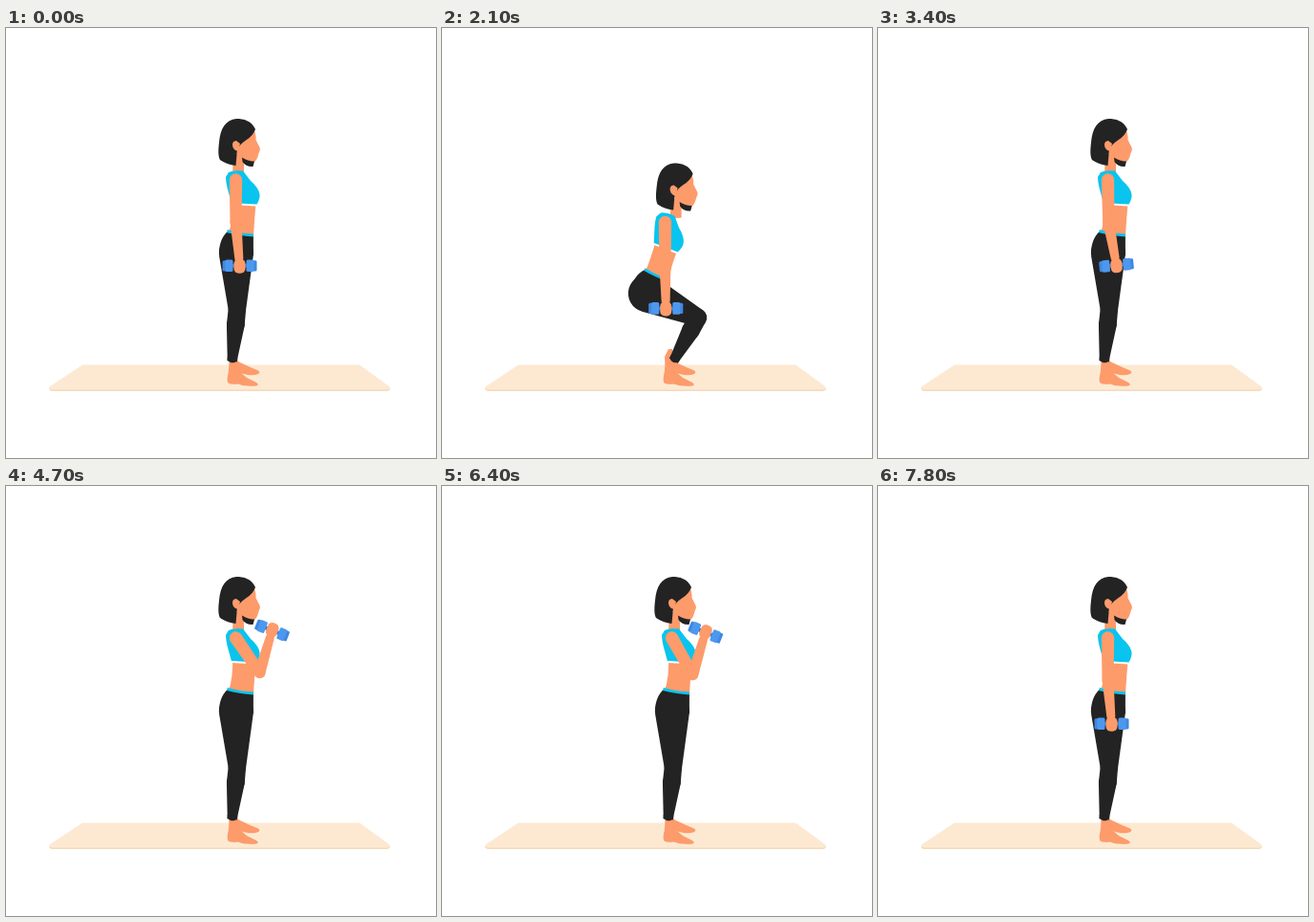
These frames come from a looping animation (450x450 px, 8000 ms). An HTML page with a canvas:

```html
<!DOCTYPE html>
<html lang="en">
<head>
<meta charset="utf-8">
<title>Squat, curl and press</title>
<style>
  html, body { margin: 0; width: 100%; height: 100%; overflow: hidden; background: #fff; }
  canvas { display: block; width: 450px; height: 450px; }
</style>
</head>
<body>
<canvas id="stage" width="450" height="450"></canvas>
<script>
const ctx = document.getElementById('stage').getContext('2d');
const LOOP = 8000, STEP = 100, RAD = Math.PI / 180;
const SKIN = '#fd9b6b', BLACK = '#232323', CYAN = '#08c4ee';

const ease = (t, from, to) => {
  const x = Math.min(1, Math.max(0, (t - from) / (to - from)));
  return (1 - Math.cos(Math.PI * x)) / 2;
};

function shape(path, color) {
  ctx.fillStyle = color;
  ctx.fill(new Path2D(path));
}

// Hull of two circles [x, y, r]
function limb([x1, y1, r1], [x2, y2, r2], color) {
  const dir = Math.atan2(y2 - y1, x2 - x1);
  const off = Math.acos((r1 - r2) / Math.hypot(x2 - x1, y2 - y1));
  ctx.fillStyle = color;
  ctx.beginPath();
  ctx.arc(x1, y1, r1, dir + off, dir - off + 2 * Math.PI);
  ctx.arc(x2, y2, r2, dir - off, dir + off);
  ctx.fill();
}

function box(x, y, w, h, r, color) {
  ctx.fillStyle = color;
  ctx.beginPath();
  ctx.roundRect(x, y, w, h, r);
  ctx.fill();
}

// A rigid part: turns around a pivot, which then moves to a new place
function frame(px, py, x, y, deg) {
  const c = Math.cos(deg * RAD), s = Math.sin(deg * RAD);
  return {
    at: (u, v) => [x + (u - px) * c - (v - py) * s, y + (u - px) * s + (v - py) * c],
    draw(paint) {
      ctx.save();
      ctx.translate(x, y);
      ctx.rotate(deg * RAD);
      ctx.translate(-px, -py);
      paint();
      ctx.restore();
    }
  };
}

// Angle 0 hangs down, positive swings forward
const swing = ([x, y], length, deg) =>
  [x + length * Math.sin(deg * RAD), y + length * Math.cos(deg * RAD)];

function drawMat() {
  shape('M49 374H398L402 377Q402 380 398 380H49Q45 380 45 377Z', '#f3dabd');
  shape('M80 352.5H370L401 375Q403 378.5 398 378.5H49Q44 378.5 46 375Z', '#fde9d2');
}

function drawFeet() {
  shape('M238 346L245 350Q255 355 263 358Q267 360 264 362Q260 364 253 363L240 360Z', SKIN);
  shape('M233 344L237 336H241L242 344L243 355Q245 361 252 366L261 370.5Q266 373 262 374.5Q250 375.5 243 372.5Q235 373.5 232.5 371.5Q231 369 232 364Q234 356 233 344Z', SKIN);
}

function drawHead() {
  shape('M238 132H249V152L237 153Z', SKIN);
  shape('M258 104Q262 110 261.5 117L265 124Q267 127 264.5 131Q263 138 260 140L245 138L236 118Z', SKIN);
  shape('M247 135.5Q253 139.5 260 139.5L258.5 145Q251 145.5 247.5 140Z', BLACK);
  shape('M261 106C257 97 249 95 241 95C230 96 224 105 223 120C222 128 222 134 224 138Q231 143 240.5 144L242 127Q245 121.5 251 117.5Q258.5 113 261 106Z', BLACK);
  shape('M241 118C237 118 236 122 238 126Q240 129 243 129L245 121Z', SKIN);
}

function drawTop() {
  shape('M233 151Q238 148.5 248 149.5L256 160Q263 166 265 172Q267 178 262 185L236 183.5L231.5 167Q230 161 230 156Z', CYAN);
  shape('M236 183L262 184.5V186.5L236 185Z', '#fff');
}

function drawDumbbell() {
  box(-9, -2, 18, 4, 1, '#3474c4');
  for (const side of [-1, 1]) {
    box(side * 15.5 - 2.5, -5.6, 5, 11.2, 1.5, '#4088e0');
    box(side * 11 - 4, -6.3, 8, 12.6, 1.5, '#4d98ef');
  }
}

function drawArm(shoulder, upper, fore, tilt) {
  const elbow = swing(shoulder, 44, upper);
  const wrist = swing(elbow, 38, fore);
  const hand = swing(elbow, 46, fore);
  limb([...shoulder, 6.7], [...elbow, 6], SKIN);
  limb([...elbow, 6], [...wrist, 4.5], SKIN);
  frame(0, 0, ...hand, tilt).draw(() => {
    drawDumbbell();
    box(-6, -7, 12, 15, 5, SKIN);
  });
}

function drawLeg(hip, hipRadius, knee, cuff) {
  const [dx, dy] = [cuff[0] - knee[0], cuff[1] - knee[1]];
  const calf = [knee[0] + dx * .32, knee[1] + dy * .32, 9.4];
  limb([...hip, hipRadius], [...knee, 9.2], BLACK);
  limb([...knee, 9.2], calf, BLACK);
  limb(calf, [...cuff, 5.3], BLACK);
  frame(0, 0, ...cuff, Math.atan2(-dx, dy) / RAD).draw(() => box(-5.3, -1, 10.6, 5, 1, BLACK));
}

function drawBelly(chest, pelvis) {
  const outline = [
    chest.at(237, 180), chest.at(262, 180), chest.at(260, 198),
    pelvis.at(259, 220), pelvis.at(233, 215), chest.at(238, 199)
  ];
  ctx.fillStyle = SKIN;
  ctx.beginPath();
  ctx.moveTo(...outline[0]);
  ctx.lineTo(...outline[1]);
  ctx.quadraticCurveTo(...outline[2], ...outline[3]);
  ctx.lineTo(...outline[4]);
  ctx.quadraticCurveTo(...outline[5], ...outline[0]);
  ctx.fill();
}

function draw(t) {
  const squat = Math.pow(ease(t, 300, 1600) - ease(t, 1740, 3080), 1.2);
  const curl = ease(t, 3260, 4450) - ease(t, 6500, 7750);
  const press = ease(t, 4580, 5520) - ease(t, 5600, 6440);

  const shift = 6 * squat * squat - 14 * squat * (1 - squat);
  const drop = 58 * squat;
  const ankle = [237 + 2 * squat, 345];
  const cuff = [ankle[0] + 7 * squat, ankle[1]];
  const knee = swing(ankle, -52, -5.4 - 36 * squat);
  knee[1] += 1;
  const hipY = 236 + 52 * squat;
  const rise = knee[1] - hipY;
  const thigh = 57.5 + 2 * squat;
  const hip = [knee[0] - Math.sqrt(Math.max(1, thigh ** 2 - rise ** 2)), hipY];

  const chest = frame(243, 130, 243 + shift, 130 + drop, 22 * squat);
  const pelvis = frame(241, 236, ...hip, 20 * squat);

  ctx.fillStyle = '#fff';
  ctx.fillRect(0, 0, 450, 450);
  drawMat();
  drawFeet();
  drawBelly(chest, pelvis);
  drawLeg(hip, 18 + 2 * squat, knee, cuff);
  pelvis.draw(() => {
    shape('M232 213C226 218 223 227 223 236L241 245L259 238V217Z', BLACK);
    shape('M232 211Q245 215 259 215.5V218.5Q243 217 231 214Z', CYAN);
  });
  frame(0, 0, shift, drop, 0).draw(drawHead);
  chest.draw(drawTop);

  const bend = 158 * curl + 14 * press;
  drawArm(chest.at(240.5, 159), 29 * curl + 141 * press, 5 + bend - 5 * squat, -bend);
}

const start = performance.now();
function tick() {
  const t = (performance.now() - start) % LOOP;
  draw(Math.floor(t / STEP) * STEP);
  requestAnimationFrame(tick);
}
tick();
</script>
</body>
</html>
```
